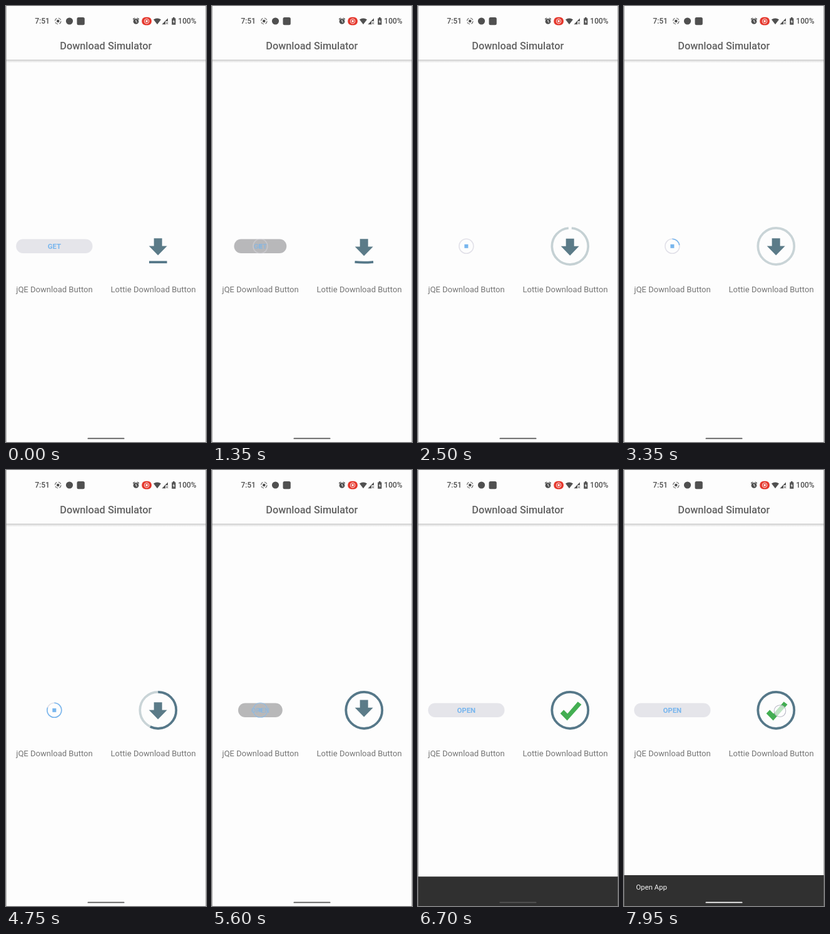
Animation of 320 by 693 pixels, one loop 8 s. Source, as an HTML page:

```html
<!DOCTYPE html>
<html lang="en">
<head>
<meta charset="utf-8">
<title>Download Simulator</title>
<style>
  html, body { margin: 0; width: 100%; height: 100%; overflow: hidden; background: #fdfdfd; }
  svg { display: block; width: 100%; height: 100%; }
  text { font-family: Roboto, sans-serif; text-anchor: middle; }
  .label { font-size: 13.05px; fill: #757575; }
  .status { font-size: 12px; font-weight: 500; fill: #505050; }
  .action { font-size: 11.4px; font-weight: 700; fill: #78b6ee; }
  .line { fill: none; stroke-width: 3.7; }
</style>
</head>
<body>
<svg viewBox="0 0 320 693">
  <defs>
    <linearGradient id="shade" x2="0" y2="1">
      <stop stop-color="#bdbdbd"/><stop offset=".35" stop-color="#e4e4e4"/><stop offset="1" stop-color="#fdfdfd"/>
    </linearGradient>
  </defs>
  <rect width="320" height="693" fill="#fdfdfd"/>
  <rect y="85.5" width="320" height="5" fill="url(#shade)"/>

  <g fill="#505050">
    <text class="status" x="58" y="28">7:51</text>
    <circle cx="83.2" cy="24" r="4.8" fill="none" stroke="#606060" stroke-width="1.1" stroke-dasharray="5 2.54"/>
    <circle cx="83.2" cy="24" r="2.3"/>
    <circle cx="101.5" cy="24" r="5.6"/>
    <rect x="113.5" y="18" width="12.3" height="12.3" rx="2.5"/>
    <circle cx="208" cy="24.4" r="4.4"/>
    <path d="M203.2 21.3l2.6-2.3M212.8 21.3l-2.6-2.3" stroke="#505050" stroke-width="1.3"/>
    <path d="M208 21.8v3l2 1.2" fill="none" stroke="#fdfdfd"/>
    <rect x="217.3" y="17.8" width="15.6" height="12.6" rx="6" fill="#e5372c"/>
    <circle cx="225.1" cy="24.1" r="3.8" fill="none" stroke="#fff" stroke-width=".9"/>
    <circle cx="225.1" cy="24.1" r="1.8" fill="#fff"/>
    <path d="M236 21.6q6-4.4 12 0l-6 7.6z"/>
    <path d="M249.5 29.2l9.5-9.8v4.8h-4v5z"/>
    <path d="M255.8 25.6l3.4 3.4m0-3.4l-3.4 3.4" stroke="#505050"/>
    <path d="M265.3 19.5h1.7v-1.4h2.7v1.4h1.7v10.3h-6.1z"/>
    <path d="M268.9 21.5l-2.2 3.8h1.4v2.8l2-3.7h-1.4z" fill="#fdfdfd"/>
    <text class="status" x="290" y="28">100%</text>
  </g>
  <text x="159.8" y="69" font-size="16.3" font-weight="500" fill="#626262">Download Simulator</text>
  <text class="label" x="77.5" y="455">jQE Download Button</text>
  <text class="label" x="235.6" y="455">Lottie Download Button</text>

  <rect id="pill" y="370.5" height="22.6" rx="11.3"/>
  <text id="get" class="action" x="77.3" y="386">GET</text>
  <text id="open" class="action" x="77.3" y="386">OPEN</text>
  <g id="loader">
    <circle cx="77.3" cy="381.8" r="11.5" fill="none" stroke="#e1e0e8" stroke-width="1.6"/>
    <circle id="loaded" cx="77.3" cy="381.8" r="11.5" fill="none" stroke="#78b6ee" stroke-width="1.6"
            pathLength="1" transform="rotate(-90 77.3 381.8)"/>
    <rect x="74.3" y="378.8" width="6" height="6" fill="#78b6ee"/>
  </g>

  <path id="tray" class="line"/>
  <circle id="filled" class="line" cx="243.3" cy="381.8" r="29" stroke="#567889"
          pathLength="1" transform="rotate(-90 243.3 381.8)"/>
  <path id="arrow" d="M-6.5 0h13v12.2h8L0 27l-14.5-14.8h8z" fill="#5b7b88"/>
  <path id="check" d="M-16 5.2l5.5-5.7 6 6L12-13.5l5.8 4.5L-5 16.4z" fill="#43ae52"/>
  <circle id="touch" r="9.3" fill="#fff" fill-opacity=".65" stroke="#b9b9c6" stroke-width="1.1"/>

  <rect id="snack" width="320" height="50" fill="#303030"/>
  <text id="message" x="44" y="667" font-size="11.4" fill="#f5f5f5">Open App</text>
  <rect id="handle" x="130.5" y="686.5" width="59" height="1.8" rx=".9"/>
  <path d="M.25 0v693M319.75 0v693" stroke="#777" stroke-width=".7"/>
</svg>
<script>
const LOOP = 8000, CX = 243.3, CY = 381.8;
const el = id => document.getElementById(id);
const set = (id, attrs) => {
  for (const name in attrs) el(id).setAttribute(name, attrs[name]);
};
const mix = (a, b, p) => a + (b - a) * p;
const mixColor = (a, b, p) => `rgb(${a.map((v, i) => Math.round(mix(v, b[i], p)))})`;
const span = (t, start, length) => Math.min(1, Math.max(0, (t - start) / length));

function bezier(x1, y1, x2, y2) {
  const at = (a, b, u) => 3 * a * u * (1 - u) ** 2 + 3 * b * u * u * (1 - u) + u ** 3;
  return x => {
    let low = 0, high = 1;
    for (let i = 0; i < 20; i++) {
      const mid = (low + high) / 2;
      if (at(x1, x2, mid) < x) low = mid; else high = mid;
    }
    return at(y1, y2, low);
  };
}
const ease = bezier(.25, .1, .25, 1);
const standard = bezier(.4, 0, .2, 1);
const eased = (t, start, length, curve = ease) => curve(span(t, start, length));

function drawPillButton(t) {
  const shrink = eased(t, 1230, 500), grow = eased(t, 5460, 500);
  const solid = 1 - shrink + grow;
  const width = mix(24, 122.4, solid);
  const [gray, blue] = [229 * solid, 234 * solid];
  set('pill', { x: 77.3 - width / 2, width, fill: `rgba(${gray},${gray},${blue},${solid})` });
  set('get', { opacity: 1 - shrink });
  set('open', { opacity: grow });
  set('loader', { opacity: shrink - grow });

  // The download advances in uneven steps.
  const steps = [[2600, .15], [3300, .3], [4030, .35], [4740, .2]];
  const progress = steps.reduce((sum, [start, part]) => sum + part * span(t, start, 200), 0);
  set('loaded', { 'stroke-dasharray': `${progress} 2` });
}

function drawArrowButton(t) {
  const bend = eased(t, 1250, 550, standard), wrap = eased(t, 1930, 750, standard);
  // The tray line bends, then closes into a ring.
  const angle = mix(mix(.01, .79, bend), Math.PI, wrap);
  const radius = mix(mix(14.3, 19, bend), 29 * Math.PI, wrap) / angle;
  const bottom = mix(407.2, CY + 29, bend);
  const dx = radius * Math.sin(angle), y = bottom - radius * (1 - Math.cos(angle));
  const arc = `A${radius} ${radius} 0 0 0`;
  set('tray', {
    d: `M${CX - dx} ${y}${arc} ${CX} ${bottom}${arc} ${CX + dx} ${y}`,
    stroke: mixColor([86, 120, 137], [201, 212, 215], wrap)
  });

  const filled = .57 * span(t, 3700, 650) + .43 * span(t, 4750, 550);
  set('filled', { 'stroke-dasharray': `${filled} 2` });

  const top = 369.3 + 9 * (bend - wrap) - 3.8 * eased(t, 5450, 150);
  const gone = eased(t, 5620, 200);
  set('arrow', { transform: `translate(${CX - .1} ${top + 13 * gone}) scale(${1 - gone})` });
  set('check', { transform: `translate(${CX + .4} ${CY}) scale(${eased(t, 5780, 350)})` });
}

function drawTouch(t) {
  const taps = [[1150, 1300, 250, 380], [6400, 6550, 250.5, 378], [7850, 8000, 249.5, 383]];
  const tap = taps.find(([from, to]) => t >= from && t < to);
  set('touch', { opacity: tap ? 1 : 0, cx: tap ? tap[2] : 0, cy: tap ? tap[3] : 0 });
}

function drawSnackbar(t) {
  set('snack', { y: mix(693, 644, eased(t, 6480, 300, standard)) });
  set('message', { opacity: span(t, 6710, 180) });
  set('handle', { fill: mixColor([85, 85, 85], [255, 255, 255], span(t, 6710, 200)) });
}

function frame() {
  const t = performance.now() % LOOP;
  drawPillButton(t);
  drawArrowButton(t);
  drawTouch(t);
  drawSnackbar(t);
  requestAnimationFrame(frame);
}
frame();
</script>
</body>
</html>
```
